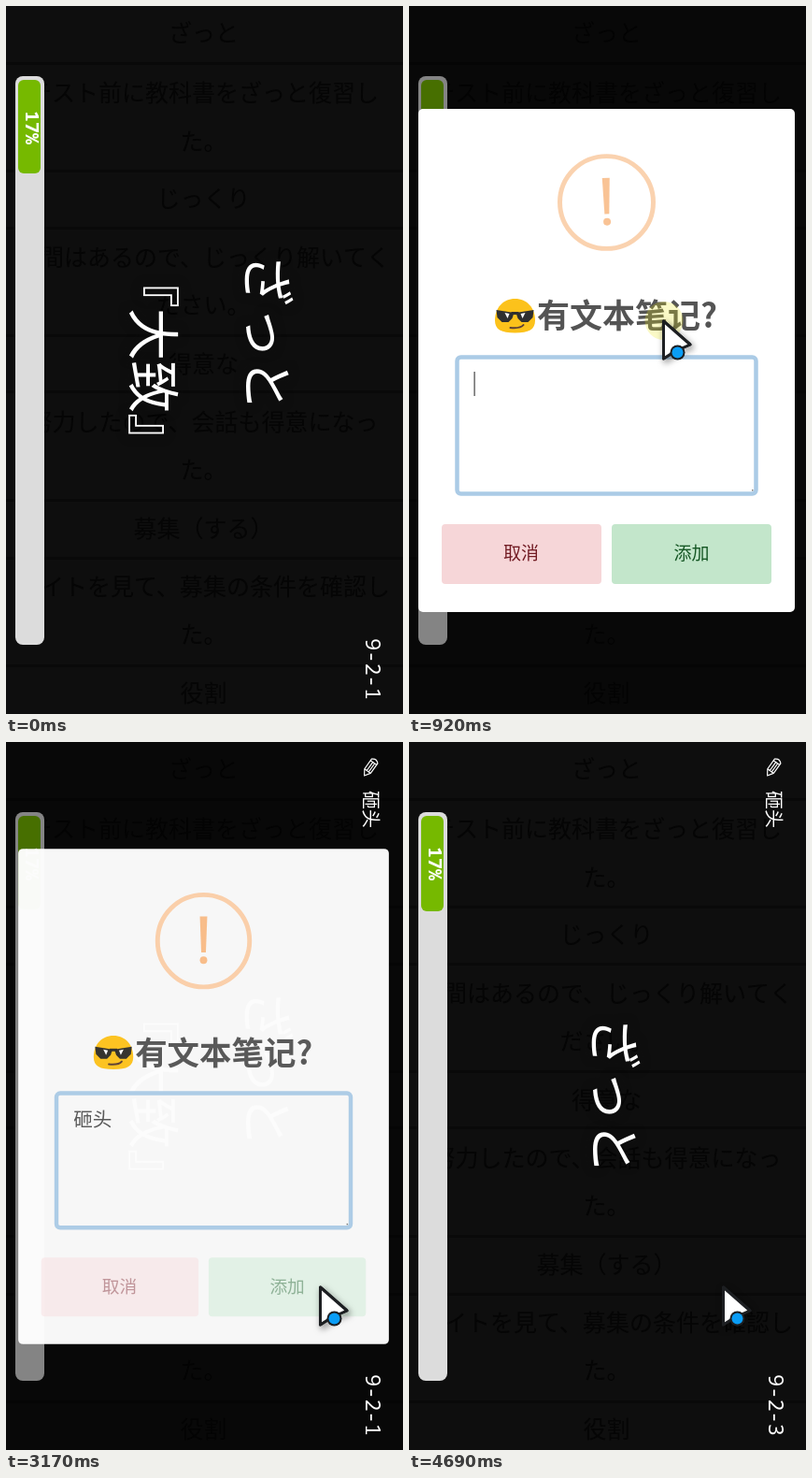
These frames come from a looping animation (425x757 px, 4.77 s). An HTML page with a canvas:

```html
<!DOCTYPE html>
<html lang="zh">
<head>
<meta charset="utf-8">
<style>
html, body { margin: 0; width: 100%; height: 100%; overflow: hidden; background: #0e0e0e; }
canvas { display: block; width: 425px; height: 757px; }
</style>
</head>
<body>
<canvas id="stage" width="425" height="757"></canvas>
<script>
const ctx = document.getElementById('stage').getContext('2d');
const LOOP = 4770, CX = 211.5, CY = 379;
const SC = '"Noto Sans CJK SC", "Noto Sans CJK", sans-serif';
const JP = '"Noto Sans CJK JP", "Noto Sans CJK", sans-serif';
const MONO = '"Noto Sans Mono", monospace';

const rows = [
  [28, 'ざっと'], [92, 'テスト前に教科書をざっと復習し'], [144, 'た。'],
  [205, 'じっくり'], [268, '時間はあるので、じっくり解いてく'], [319, 'ださい。'],
  [382, '得意な'], [444, '努力したので、会話も得意になっ'], [495, 'た。'],
  [558, '募集（する）'], [620, 'サイトを見て、募集の条件を確認し'], [671, 'た。'], [734, '役割']
];
const rules = [61, 176, 237, 352, 412, 528, 590, 705];

// Pointer path: time, x, y
const path = [
  [2040, 272, 336], [2150, 278, 308], [2220, 284, 325], [2360, 301, 425],
  [2500, 314, 517], [2570, 323, 543], [2650, 331, 567], [2770, 336, 582]
];

const clamp = v => Math.max(0, Math.min(1, v));
const span = (t, a, b) => clamp((t - a) / (b - a));
const within = (t, a, b) => t >= a && t < b;

// cubic-bezier(.25, .1, .25, 1)
function ease(x) {
  let lo = 0, hi = 1, u = x;
  const bez = (a, b, s) => 3 * a * s * (1 - s) ** 2 + 3 * b * s * s * (1 - s) + s ** 3;
  for (let i = 0; i < 16; i++) {
    u = (lo + hi) / 2;
    if (bez(.25, .25, u) < x) lo = u; else hi = u;
  }
  return bez(.1, 1, u);
}

// Keyframes [time, v1, v2...], interpolated with an easing per segment
function track(keys, t, fn = v => v) {
  if (t <= keys[0][0]) return keys[0].slice(1);
  for (let i = 1; i < keys.length; i++) {
    const a = keys[i - 1], b = keys[i];
    if (t < b[0]) {
      const p = fn((t - a[0]) / (b[0] - a[0]));
      return a.slice(1).map((v, k) => v + (b[k + 1] - v) * p);
    }
  }
  return keys[keys.length - 1].slice(1);
}

function layer(alpha, draw) {
  if (alpha <= 0) return;
  ctx.save();
  ctx.globalAlpha *= alpha;
  draw();
  ctx.restore();
}

function box(x, y, w, h, r, fill) {
  ctx.beginPath();
  ctx.roundRect(x, y, w, h, r);
  ctx.fillStyle = fill;
  ctx.fill();
}

function disc(x, y, r, fill) {
  ctx.beginPath();
  ctx.arc(x, y, r, 0, 7);
  ctx.fillStyle = fill;
  ctx.fill();
}

function poly(points, fill) {
  ctx.beginPath();
  points.forEach(([x, y]) => ctx.lineTo(x, y));
  ctx.closePath();
  ctx.fillStyle = fill;
  ctx.fill();
}

// Text centred vertically on y
function text(str, x, y, size, fill, family = SC, weight = 400, align = 'left') {
  ctx.font = `${weight} ${size}px ${family}`;
  ctx.textAlign = align;
  ctx.fillStyle = fill;
  ctx.fillText(str, x, y + size * (family === MONO ? .36 : .38));
}

function sideText(str, x, y, ...style) {
  ctx.save();
  ctx.translate(x, y);
  ctx.rotate(Math.PI / 2);
  text(str, 0, 0, ...style);
  ctx.restore();
}

function shadow(color, blur, dx = 0, dy = 0) {
  ctx.shadowColor = color;
  ctx.shadowBlur = blur;
  ctx.shadowOffsetX = dx;
  ctx.shadowOffsetY = dy;
}

function page(t) {
  ctx.fillStyle = '#0e0e0e';
  ctx.fillRect(0, 0, 425, 757);
  ctx.fillStyle = '#090909';
  rules.forEach(y => ctx.fillRect(0, y - 1, 425, 3));
  rows.forEach(([y, s]) => text(s, CX, y, 25, '#050505', JP, 400, 'center'));

  box(10, 75, 31, 608, 8, '#dcdcdc');
  box(13, 79, 24, 100 + 2 * span(t, 4370, 4530), 6, '#76b900');
  sideText('17%', 28, 112, 20, '#fff', MONO, 700);
}

function words(t) {
  const first = t < 3770;
  const alpha = first ? 1 : t < 4370 ? span(t, 3770, 4010) : span(t, 4370, 4650);
  layer(alpha, () => {
    shadow('#0e0e0e', 12);
    sideText('ざっと', first ? 280 : 220, first ? 265 : 294, 56, '#fff', JP);
    if (first) sideText('『大致』', 158, 267, 56, '#fff');
  });
}

function pencil() {
  ctx.save();
  ctx.translate(390, 27);
  ctx.rotate(-.95);
  ctx.strokeStyle = '#fff';
  ctx.lineWidth = 1.2;
  ctx.lineJoin = 'round';
  ctx.beginPath();
  ctx.moveTo(-11, 0);
  ctx.lineTo(-5, -4);
  ctx.lineTo(8, -4);
  ctx.quadraticCurveTo(12, 0, 8, 4);
  ctx.lineTo(-5, 4);
  ctx.closePath();
  ctx.moveTo(-5, -4);
  ctx.lineTo(-5, 4);
  ctx.moveTo(-5, -1);
  ctx.lineTo(6, -1);
  ctx.moveTo(-5, 1.5);
  ctx.lineTo(6, 1.5);
  ctx.moveTo(6, -4);
  ctx.lineTo(6, 4);
  ctx.stroke();
  ctx.restore();
}

function corners(t) {
  if (!within(t, 600, 3050)) {
    const n = t < 3770 ? 1 : t < 4370 ? 2 : 3;
    sideText('9-2-' + n, 393, 676, 22, '#fff', MONO);
  }
  if (t >= 3050) {
    pencil();
    sideText('砸头', 391, 52, 20, '#fff');
  }
}

function warning(t) {
  const p = ease(span(t, 620, 1090));
  const squash = Math.cos((1 - p) * 100 * Math.PI / 180);
  const [turn, seen] = track([
    [620, 45, 0], [740, -25, .4], [860, 15, .8], [975, -5, 1], [1090, 0, 1]
  ], t, ease);
  layer(p, () => {
    ctx.translate(CX, 210);
    ctx.scale(1, squash || .01);
    ctx.beginPath();
    ctx.arc(0, 0, 50, 0, 7);
    ctx.strokeStyle = '#facea8';
    ctx.lineWidth = 5;
    ctx.stroke();
    layer(seen, () => {
      ctx.rotate(turn * Math.PI / 180);
      poly([[-4, -26.5], [4, -26.5], [2.5, 12.5], [-2.5, 12.5]], '#f8bb86');
      disc(0, 21, 4, '#f8bb86');
    });
  });
}

function coolFace() {
  ctx.save();
  ctx.translate(113.5, 331);
  ctx.beginPath();
  ctx.moveTo(0, -18);
  ctx.bezierCurveTo(13, -18, 21.5, -8, 21.5, 5);
  ctx.bezierCurveTo(21.5, 15, 15, 18.5, 0, 18.5);
  ctx.bezierCurveTo(-15, 18.5, -21.5, 15, -21.5, 5);
  ctx.bezierCurveTo(-21.5, -8, -13, -18, 0, -18);
  ctx.fillStyle = '#fcc21b';
  ctx.fill();
  const lens = [[1, -3], [20, -6], [19, 2], [14, 7], [7, 7], [3, 3]];
  [1, -1].forEach(side => {
    poly(lens.map(([x, y]) => [x * side, y]), '#2f2f2f');
    poly([[6 * side, -2], [11 * side, -3], [8 * side, 3]], '#fff');
  });
  ctx.fillStyle = '#2f2f2f';
  ctx.fillRect(-4, -4, 8, 3);
  ctx.beginPath();
  ctx.moveTo(-5, 13);
  ctx.quadraticCurveTo(6, 14, 9, 10);
  ctx.strokeStyle = '#5d4037';
  ctx.lineWidth = 2;
  ctx.lineCap = 'round';
  ctx.stroke();
  ctx.restore();
}

function noteField(t) {
  const typed = t >= 1800;
  ctx.beginPath();
  ctx.roundRect(51.5, 375.5, 320, 146, 4);
  ctx.strokeStyle = '#abcbe6';
  ctx.lineWidth = 4.5;
  ctx.stroke();
  ctx.fillStyle = '#777';
  ctx.fillRect(367, 517, 1.5, 1.5);
  if (typed) text('砸头', 70, 404, 21, '#545454');
  if (t < 1520 || within(t, 1800, 2290) || within(t, 2690, 3110)) {
    ctx.fillStyle = '#444';
    ctx.fillRect(typed ? 112 : 69.5, 391, 1.2, 26);
  }
}

function dialog(t) {
  if (!within(t, 620, 3290)) return;
  const grow = track([[620, .7], [755, 1.05], [860, .95], [920, 1]], t, ease)[0];
  const leave = ease(span(t, 3165, 3290));
  const scale = t < 3100 ? grow : 1 - leave * .5;
  layer(1 - leave, () => {
    ctx.translate(CX, CY);
    ctx.scale(scale, scale);
    ctx.translate(-CX, -CY);
    box(10, 110, 403, 538, 5, '#fff');
    warning(t);
    coolFace();
    text('有文本笔记?', 137, 331, 35, '#545454', SC, 700);
    noteField(t);
    layer(1 - .58 * span(t, 3050, 3150), () => {
      box(35, 554, 171, 64, 4, '#f6d6d8');
      box(217, 554, 171, 64, 4, '#c3e6cb');
      text('取消', 120, 585, 19, '#721c24', SC, 400, 'center');
      text('添加', 302.5, 585, 19, '#155724', SC, 400, 'center');
    });
  });
}

function inputPanel(t) {
  if (!within(t, 1080, 1800)) return;
  const [keys, hint] = t < 1320 ? ['z', '在'] : t < 1520 ? ['za', '咋'] : ["za't", '咋填'];
  layer(t < 1760 ? 1 : .5, () => {
    ctx.save();
    shadow('rgba(0,0,0,.55)', 16, 0, 5);
    box(287, 393, 170, 158, 10, '#111');
    ctx.restore();
    ctx.beginPath();
    ctx.roundRect(287.5, 393.5, 170, 157, 10);
    ctx.strokeStyle = '#4a4a4a';
    ctx.lineWidth = 1;
    ctx.stroke();
    ctx.font = '700 36px "DejaVu Sans Mono", monospace';
    ctx.textAlign = 'left';
    ctx.fillStyle = '#2383f7';
    ctx.fillText(keys, 321, 460);
    ctx.fillStyle = '#fff';
    ctx.fillRect(320 + ctx.measureText(keys).width, 417, 1.5, 53);
    text('1.', 350, 504, 36, '#fff', SC, 500, 'right');
    text(hint, 348, 504, 38, '#fff', SC, 500);
  });
}

function badge() {
  ctx.save();
  ctx.translate(101, 64);
  disc(0, 0, 18, '#e8b45c');
  ctx.setLineDash([8, 5]);
  ctx.beginPath();
  ctx.arc(0, 0, 16, 0, 7);
  ctx.strokeStyle = '#c983b5';
  ctx.lineWidth = 3;
  ctx.stroke();
  ctx.setLineDash([]);
  disc(0, -1, 13, '#a9cdf0');
  ctx.beginPath();
  ctx.moveTo(-4, -1);
  ctx.lineTo(0, -9);
  ctx.quadraticCurveTo(4, -10, 3, -3);
  ctx.lineTo(8, -3);
  ctx.quadraticCurveTo(10, 2, 7, 7);
  ctx.lineTo(-4, 7);
  ctx.closePath();
  ctx.fillStyle = '#fde3cf';
  ctx.strokeStyle = '#6b5a86';
  ctx.lineWidth = 1.2;
  ctx.fill();
  ctx.stroke();
  box(-9, -1, 5, 9, 1, '#fff');
  ctx.restore();
}

function toast(t) {
  const inward = ease(span(t, 3200, 3290));
  layer(inward * (1 - ease(span(t, 3870, 4290))), () => {
    ctx.translate(0, (inward - 1) * 24);
    const tint = ctx.createLinearGradient(120, -28, 303, 155);
    tint.addColorStop(0, '#00b09b');
    tint.addColorStop(1, '#96c93d');
    ctx.save();
    shadow('rgba(0,0,0,.6)', 14, 0, 6);
    box(63, 29.5, 297, 68, 9, tint);
    ctx.restore();
    badge();
    text('修改文本笔记成功', 127, 64, 25, '#fff', SC, 500);
    text('！', 327, 64, 25, '#fff', JP, 500);
  });
}

function pointer(t) {
  if (t < 80) return;
  const [x, y] = track(path, t);
  layer(.85 * (1 - span(t, 640, 1040)), () => disc(273, 336.5, 20.5, '#ece51e'));
  ctx.save();
  ctx.translate(x, y);
  ctx.beginPath();
  [[.5, 1], [.5, 41], [13, 33], [29, 26]].forEach(([px, py]) => ctx.lineTo(px, py));
  ctx.closePath();
  ctx.lineJoin = 'round';
  ctx.lineWidth = 3;
  ctx.strokeStyle = '#1d1f22';
  ctx.save();
  shadow('rgba(0,0,0,.6)', 7, 2, 3);
  ctx.stroke();
  ctx.restore();
  ctx.fillStyle = '#fff';
  ctx.fill();
  ctx.stroke();
  disc(15.5, 34.5, 8, '#1d1f22');
  disc(15.5, 34.5, 6, '#0a9df6');
  ctx.restore();
}

function draw(t) {
  page(t);
  words(t);
  const dim = span(t, 600, 700) * (1 - span(t, 3175, 3290));
  layer(.4 * dim, () => {
    ctx.fillStyle = '#000';
    ctx.fillRect(0, 0, 425, 757);
  });
  corners(t);
  dialog(t);
  inputPanel(t);
  toast(t);
  pointer(t);
}

const start = performance.now();
function tick() {
  draw((performance.now() - start) % LOOP);
  requestAnimationFrame(tick);
}
tick();
</script>
</body>
</html>
```
